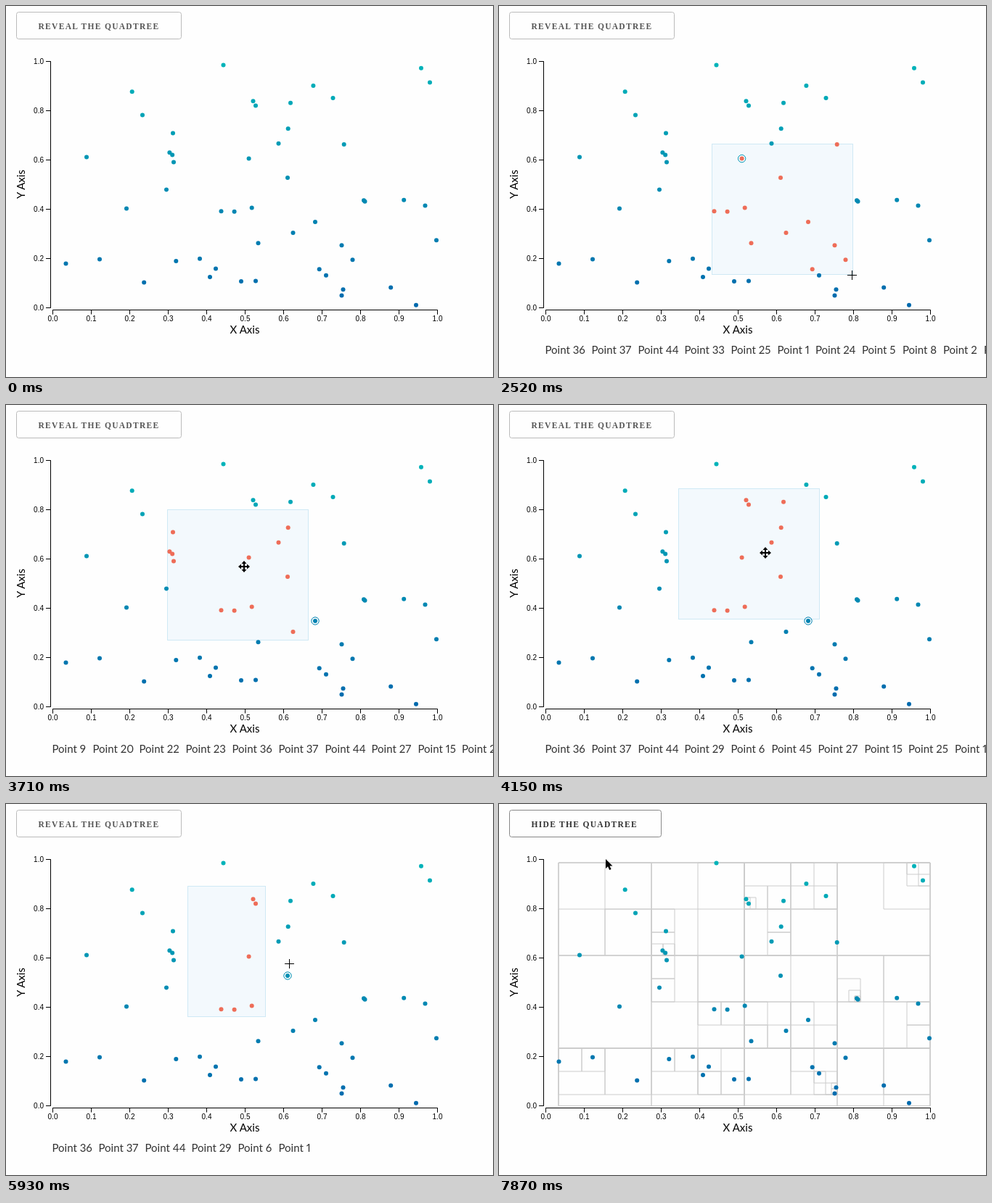
These frames come from a looping animation (671 px wide and 512 px high, 8000 ms). An HTML page:

```html
<!DOCTYPE html>
<html lang="en">
<head>
<meta charset="utf-8">
<title>Quadtree brush</title>
<style>
  html, body { margin: 0; width: 100%; height: 100%; overflow: hidden; background: #fefefe; }
  svg { display: block; }
  .tick { font: 10px "Liberation Sans", sans-serif; }
  .label { font: 15px Lato, sans-serif; font-variant-numeric: proportional-nums; }
  .button { font: bold 11.5px "Liberation Serif", serif; letter-spacing: 1.3px; }
</style>
</head>
<body>
<svg width="671" height="512" viewBox="0 0 671 512">
  <g id="axes"></g>
  <g id="scene"></g>
</svg>
<script>
const LOOP = 8000;
const STEP = 148.2;
const REVEAL_STEP = 50;
const CORAL = '#ee6d58';

// The plotted data; the index of a point is the number in its label.
const points = [
  [299.5, 81.5], [338.7, 278.4], [462.5, 330.2], [173.7, 118.2], [188, 150.4],
  [395.5, 313], [344, 137.4], [111, 208.6], [426, 298], [230, 175.4],
  [267, 348.8], [289, 362.5], [324, 380], [221, 253.4], [166, 279.4],
  [375.5, 189.8], [82.5, 355.5], [129, 349.5], [190.2, 381.5], [234.3, 352],
  [225.4, 202.3], [281, 374], [229.2, 205.5], [231, 215.6], [347.5, 327.3],
  [388, 237], [344, 379.5], [388.7, 169.2], [431.7, 363.2], [340.5, 131.3],
  [441, 371.8], [464.5, 391.2], [462.5, 399.6], [465.7, 191], [477.5, 350.2],
  [530.2, 388.4], [334.6, 210.6], [296.5, 283.3], [565, 412.8], [593, 323.3],
  [577.5, 275.6], [548.2, 267.8], [493, 268.3], [494.5, 269.8], [314.6, 283.8],
  [392, 133.8], [572, 85.8], [584, 105.6], [423.4, 110], [450.5, 127]
].map(([x, y], id) => ({ id, x, y, color: depthColor(y) }));

// Each gesture carries the pointer in a straight line to its target between two steps.
const gestures = [
  { mode: 'hover', from: 1, to: 3, target: [450.5, 259.5] },
  { mode: 'hover', from: 4, to: 7, target: [244.5, 238.5] },
  { mode: 'hover', from: 7, to: 8, target: [206.5, 226.5] },
  { mode: 'hover', from: 8, to: 10, target: [238.5, 298.5] },
  { mode: 'hover', from: 10, to: 14, target: [292.5, 191.5] },
  { mode: 'draw', from: 15, to: 17, target: [486.5, 371.5] },
  { mode: 'hover', from: 19, to: 20, target: [420, 297] },
  { mode: 'move', from: 20, to: 23, target: [342, 245], shift: [-56, -24] },
  { mode: 'move', from: 23, to: 25, target: [328, 223], shift: [-15, -22] },
  { mode: 'move', from: 26, to: 28, target: [367, 204], shift: [25, -29] },
  { mode: 'move', from: 28, to: 29, target: [372, 201], shift: [3, -2] },
  { mode: 'hover', from: 29, to: 31, target: [456.5, 204.5] },
  { mode: 'resize', from: 31, to: 32, target: [444.5, 206] },
  { mode: 'resize', from: 34, to: 37, target: [357.5, 207] },
  { mode: 'hover', from: 38, to: 40, target: [390.5, 220.5] },
  { mode: 'clear', from: 41, to: 46, target: [145, 25] },
  { mode: 'hover', from: 52, to: 53, target: [147, 76] }
];

const cursorShapes = {
  cross: '<path d="M-6.5 0H6.5M0 -6.5V6.5" stroke="#000"/>',
  move: '<path d="M0 -8L3.5 -4H1V-1H4V-3.5L8 0L4 3.5V1H1V4H3.5L0 8L-3.5 4H-1V1H-4V3.5L-8 0L-4 -3.5V-1H-1V-4H-3.5Z"/>',
  resize: '<path d="M-10 0L-5.5 -4V-1H-2V-6H2V-1H5.5V-4L10 0L5.5 4V1H2V6H-2V1H-5.5V4Z"/>',
  arrow: '<path d="M0 0V13L3 10.3L5.2 15L7.6 14L5.5 9.5H9.5Z"/>',
  hand: '<path d="M-2 1Q0 -2 2 1V6L8 8Q10 9 9 13L7 18H-1L-6 10Q-6 7 -2 10Z" fill="#fff" stroke="#000"/>'
};

function depthColor(y) {
  const k = (416 - y) / 340;
  const mix = (a, b) => Math.round(a + (b - a) * k);
  return `rgb(0,${mix(104, 180)},${mix(173, 185)})`;
}

const contains = (box, { x, y }) => !!box &&
  x >= box.x && x <= box.x + box.width && y >= box.y && y <= box.y + box.height;

const plotArea = { x: 64, y: 77, width: 531, height: 340 };
const buttonArea = { x: 14.5, y: 8.5, width: 209, height: 37 };

function nearest({ x, y }) {
  const distance = p => Math.hypot(p.x - x, p.y - y);
  return points.reduce((best, p) => distance(p) < distance(best) ? p : best);
}

function chooseCursor(mode, pointer, brush) {
  if (contains(buttonArea, pointer)) return 'hand';
  if (!contains(plotArea, pointer)) return 'arrow';
  if (mode === 'move' || mode === 'resize') return mode;
  return mode !== 'draw' && contains(brush, pointer) ? 'move' : 'cross';
}

function advance(state, step) {
  const gesture = gestures.findLast(g => g.from < step);
  if (!gesture || step > gesture.to) return state;
  const { mode, from, to, target, shift } = gesture;
  let { x, y, brush, picked, origin } = state;
  if (step === from + 1) origin = { x, y };

  x += (target[0] - x) / (to - step + 1);
  y += (target[1] - y) / (to - step + 1);
  if (mode === 'draw') {
    brush = { x: origin.x + 1, y: origin.y - 1, width: x - origin.x, height: y - origin.y };
  } else if (mode === 'move') {
    brush = { ...brush, x: brush.x + shift[0] / (to - from), y: brush.y + shift[1] / (to - from) };
  } else if (mode === 'resize') {
    brush = { ...brush, width: x - brush.x };
  } else {
    if (mode === 'clear') brush = null;
    picked = contains(plotArea, { x, y }) ? nearest({ x, y }) : null;
  }
  return { x, y, brush, picked, origin, cursor: chooseCursor(mode, { x, y }, brush) };
}

// The pointer enters from the right after the first two steps.
function stateAt(lastStep) {
  if (lastStep < 2) return {};
  let state = { x: 664.5, y: 297.5 };
  for (let step = 1; step <= lastStep; step++) state = advance(state, step);
  return state;
}

// Collects the non-empty cells and their points in visiting order.
const cells = [], visited = [];
(function visit(x, y, size, inside) {
  if (!inside.length) return;
  cells.push({ x, y, size });
  if (inside.length === 1) return visited.push(inside[0]);
  const half = size / 2;
  for (const south of [0, 1]) for (const east of [0, 1]) {
    visit(x + east * half, y + south * half, half, inside.filter(p =>
      (p.x >= x + half) == east && (p.y >= y + half) == south));
  }
})(82, 81, 512, points);

const quadtreePath = cells.map(({ x, y, size }) =>
  `M${x} ${y}h${size}V${Math.min(y + size, 416.5)}h${-size}Z`).join('');

const text = (x, y, content, cls, extra = '') =>
  `<text x="${x}" y="${y}" class="${cls}" ${extra}>${content}</text>`;

const rect = ({ x, y, width, height }, extra) =>
  `<rect x="${x}" y="${y}" width="${width}" height="${height}" ${extra}/>`;

const circle = ({ x, y }, r, extra) => `<circle cx="${x}" cy="${y}" r="${r}" ${extra}/>`;

function drawAxes() {
  let lines = 'M55 76.5H61.5V416.5H55M64.5 425.5V419.5H594.5V425.5';
  let labels = '';
  for (let i = 0; i <= 10; i++) {
    const x = 64.5 + 53 * i, value = (i / 10).toFixed(1);
    lines += `M${x} 419.5V425.5`;
    labels += text(x, 435, value, 'tick', 'text-anchor="middle"');
    if (i % 2) continue;
    const y = 416.5 - 34 * i;
    lines += `M55 ${y}H61.5`;
    labels += text(52, y + 3.5, value, 'tick', 'text-anchor="end"');
  }
  return `<path d="${lines}" fill="none" stroke="#000"/>${labels}` +
    text(329, 452, 'X Axis', 'label', 'text-anchor="middle"') +
    text(0, 0, 'Y Axis', 'label', 'text-anchor="middle" transform="translate(26 246) rotate(-90)"');
}

function drawButton(revealed, active) {
  const label = revealed ? 'HIDE THE QUADTREE' : 'REVEAL THE QUADTREE';
  const box = { ...buttonArea, width: revealed ? 209 : 227 };
  return rect(box, `rx="3" fill="none" stroke="${active ? '#888' : '#bbb'}"`) +
    text(44.5, 32, label, 'button', `fill="${active ? '#333' : '#555'}"`);
}

function drawList(selected) {
  let x = 63.5;
  return selected.map(({ id }) => {
    const item = text(x, 480, `Point ${id}`, 'label', 'fill="#333"');
    for (const digit of String(id)) x += digit === '1' ? 4.5 : 8;
    x += 48;
    return item;
  }).join('');
}

function drawScene(step) {
  const { x, y, brush, picked, cursor } = stateAt(step);
  const selected = visited.filter(p => contains(brush, p));
  const revealed = step >= REVEAL_STEP;

  let out = drawButton(revealed, revealed || cursor === 'hand');
  if (revealed) out += `<path d="${quadtreePath}" fill="none" stroke="#ccc"/>`;
  if (brush) out += rect(brush, 'fill="#f3f9fd" stroke="#cfe9f5"');
  for (const p of points) out += circle(p, 3, `fill="${selected.includes(p) ? CORAL : p.color}"`);
  if (picked) out += circle(picked, 5.2, `fill="none" stroke="${picked.color}"`);
  out += drawList(selected);
  if (cursor) out += `<g transform="translate(${x} ${y})">${cursorShapes[cursor]}</g>`;
  return out;
}

const scene = document.getElementById('scene');
document.getElementById('axes').innerHTML = drawAxes();

let start, shownStep;
function frame(now) {
  start ??= now;
  const step = Math.floor((now - start) % LOOP / STEP);
  if (step !== shownStep) scene.innerHTML = drawScene(shownStep = step);
  requestAnimationFrame(frame);
}
requestAnimationFrame(frame);
</script>
</body>
</html>
```
